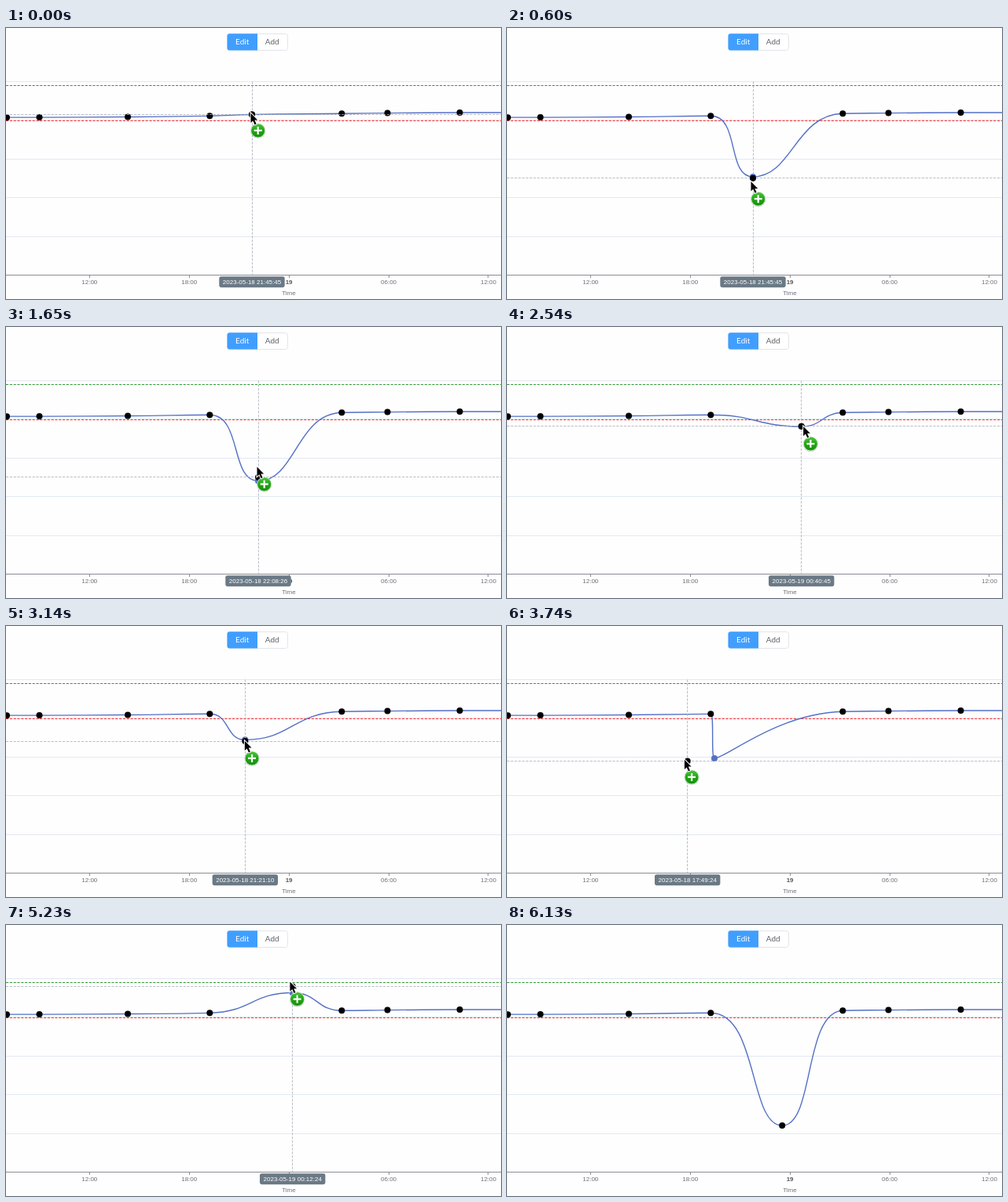
Write an HTML page that moves like this. It is 630 px wide and 346 px high and loops after 7 s.

```html
<!DOCTYPE html>
<html lang="en">
<head>
<meta charset="utf-8">
<title>Draggable line chart</title>
<style>
  html, body { margin: 0; width: 100%; height: 100%; overflow: hidden; background: #fefefe; }
  svg { display: block; width: 630px; height: 346px; font: 8px "Liberation Sans", Arial, sans-serif; }
  text { text-anchor: middle; fill: #6e7079; }
  .button { font: 10px Lato, sans-serif; fill: #606266; }
  .light { fill: #fff; }
  .bold { font-weight: bold; fill: #555; }
  .split { stroke: #e0e6f1; stroke-width: .9; }
  .axis { stroke: #6e7079; stroke-width: .8; }
  .limit { stroke-width: .8; stroke-dasharray: 3.2 1.6; }
  .pointer { stroke: #a9aeb8; stroke-width: .8; stroke-dasharray: 3.2 1.6; }
</style>
</head>
<body>
<svg viewBox="0 0 630 346">
  <defs>
    <linearGradient id="green" x2="0" y2="1">
      <stop offset="0" stop-color="#4fc63c"/>
      <stop offset=".5" stop-color="#22a516"/>
      <stop offset="1" stop-color="#158f0c"/>
    </linearGradient>
  </defs>
  <rect x="281.7" y="7.5" width="76.8" height="21" rx="3" fill="#fff" stroke="#dcdfe6" stroke-width=".8"/>
  <path d="M320 7.2H284.5Q281.5 7.2 281.5 10.2V25.5Q281.5 28.5 284.5 28.5H320Z" fill="#409eff"/>
  <text class="button light" x="300.7" y="21">Edit</text>
  <text class="button" x="338.8" y="21">Add</text>

  <g id="grid"></g>
  <path class="limit" d="M0 73.5H630" stroke="green"/>
  <path class="limit" d="M0 118.5H630" stroke="red"/>
  <text x="360" y="341.2">Time</text>

  <path id="curve" fill="none" stroke="#5470c6" stroke-width="1.4"/>
  <g id="dots"></g>
  <circle id="active" r="4"/>

  <g id="cross">
    <path id="hair-x" class="pointer"/>
    <path id="hair-y" class="pointer"/>
    <circle id="ghost" r="4"/>
    <g id="tag">
      <rect x="-41.7" y="317.2" width="83.4" height="14" rx="2.4" fill="#6a7985"/>
      <text id="stamp" class="light" y="327.2"></text>
    </g>
  </g>
  <g id="cursor">
    <g id="plus">
      <circle cx="9.7" cy="23.4" r="9.7" opacity=".18"/>
      <circle cx="9.7" cy="22.9" r="9" fill="url(#green)" stroke="#e8f3e6" stroke-width=".8"/>
      <path d="M4.7 22.9h10m-5 -5v10" stroke="#fff" stroke-width="2.2"/>
    </g>
    <path d="M.5 .8V13L3.3 10.4L5.6 15.4L7.6 14.5L5.4 9.6H9.2Z" stroke="#fff" stroke-width="2" paint-order="stroke"/>
  </g>
</svg>
<script>
const $ = id => document.getElementById(id);
const clamp = (v, a, b) => Math.max(Math.min(a, b), Math.min(Math.max(a, b), v));
const crisp = v => Math.round(v - 0.5) + 0.5;

const LOOP = 7000, STEP = 149.5, LAST = 41;
const TOP = 68.5, BOTTOM = 315.5, QUARTER = 126.92, NOON = 106.3;

// The measured values sink gently along the time axis
const sample = x => [x, 111 - 3.3 * Math.tanh((x - 330) / 170)];
const before = [-60, 1, 42.5, 155, 259.3].map(sample);
const after = [427.3, 485.5, 577.5, 690].map(sample);

// Drag path: step, clock in seconds, y, cursor offset, lag of the point
const keys = [
  [0, 78345, 110.5, -2, -2.5, 0],
  [4, 78345, 191.8, -3, 3.5, -1.8],
  [11, 79706, 191.8, -2, -14, 4.7],
  [17, 89576, 121.5, 2.3, 0.5, 0],
  [25, 64164, 172.5, -4.3, -2.5, -3.5],
  [30, 85378, 76, -4, -11, 9],
  [32, 87500, 53, -4, -8, 9],
  [LAST, 84678, 256, -2, 0, 0]
];

function pose(step) {
  const i = keys.findIndex((key, n) => n && step <= key[0]);
  const a = keys[i - 1], b = keys[i];
  const u = (step - a[0]) / (b[0] - a[0]), ease = u * u * (3 - 2 * u);
  return a.map((v, n) => v + (b[n] - v) * ease);
}

// Smooth spline whose control points stay between neighbours
function spline(pts, smooth = 0.5) {
  let d = "M" + pts[0], out = pts[0];
  for (let i = 1; i < pts.length; i++) {
    const p = pts[i], prev = pts[i - 1], next = pts[i + 1];
    let cpIn = p, cpOut = p;
    if (next) {
      const lp = Math.hypot(p[0] - prev[0], p[1] - prev[1]);
      const ln = Math.hypot(next[0] - p[0], next[1] - p[1]);
      const ahead = p.map((v, n) =>
        clamp(v + (next[n] - prev[n]) * smooth * ln / (ln + lp), v, next[n]));
      cpIn = p.map((v, n) => clamp(v - (ahead[n] - v) * lp / ln, prev[n], v));
      cpOut = p.map((v, n) => v + (v - cpIn[n]) * ln / lp);
    }
    d += `C${out} ${cpIn} ${p}`;
    out = cpOut;
  }
  return d;
}

function clock(sec) {
  const s = Math.round(sec), two = n => String(Math.floor(n)).padStart(2, "0");
  return `2023-05-${18 + Math.floor(s / 86400)} ` +
    [s / 3600 % 24, s / 60 % 60, s % 60].map(two).join(":");
}

const show = (id, on) => { $(id).style.display = on ? "" : "none"; };
const move = (id, x, y) => $(id).setAttribute("transform", `translate(${x} ${y})`);

function draw(step) {
  const [, sec, y, dx, dy, lag] = pose(step);
  const x = NOON + 0.2 + (sec / 21600 - 2) * QUARTER;
  const dragging = step < LAST, tip = y + dy;
  const point = [clamp(x, before.at(-1)[0] + 4.7, after[0][0] - 4.7), Math.max(73.5, y + lag)];

  $("curve").setAttribute("d", spline([...before, point, ...after]));
  move("active", ...point);
  $("active").setAttribute("fill", dragging && step ? "#5470c6" : "#000");

  show("cross", dragging && y >= TOP);
  $("hair-x").setAttribute("d", `M${crisp(x)} ${TOP}V${BOTTOM}`);
  $("hair-y").setAttribute("d", `M0 ${crisp(y)}H630`);
  move("ghost", x, y);
  move("tag", x, 0);
  $("stamp").textContent = clock(sec);

  show("cursor", dragging);
  show("plus", tip >= TOP);
  move("cursor", x + dx, tip);
}

function drawGrid() {
  let svg = "";
  for (let i = 0; i < 5; i++) {
    const x = NOON + i * QUARTER, y = crisp(TOP + i * (BOTTOM - TOP) / 5);
    const hour = (12 + i * 6) % 24;
    const label = hour ? String(hour).padStart(2, "0") + ":00" : "19";
    svg += `<path class="split" d="M0 ${y}H630"/>
      <path class="axis" d="M${crisp(x)} 316v3"/>
      <text x="${x}" y="327.2" class="${hour ? "" : "bold"}">${label}</text>`;
  }
  $("grid").innerHTML = svg + `<path class="axis" d="M0 ${BOTTOM}H630"/>`;
  $("dots").innerHTML = [...before, ...after]
    .map(([x, y]) => `<circle cx="${x}" cy="${y}" r="4"/>`).join("");
}

drawGrid();
const start = performance.now();
let shown = -1;
function tick() {
  const time = (performance.now() - start) % LOOP;
  const step = Math.min(LAST, Math.floor(time / STEP));
  if (step !== shown) draw(shown = step);
  requestAnimationFrame(tick);
}
tick();
</script>
</body>
</html>
```
